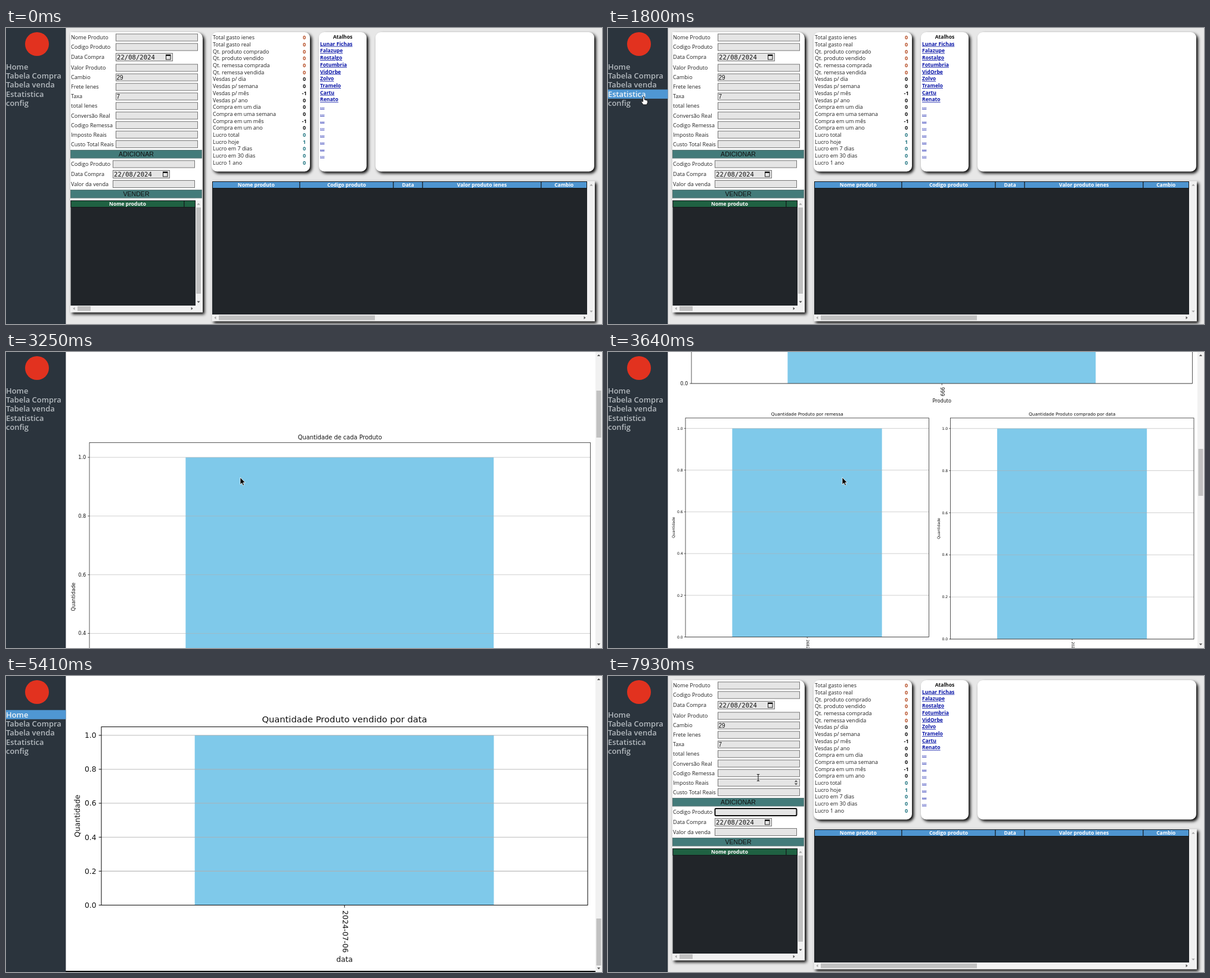
Recreate the animation shown at these times as an HTML page. Size 1000 by 498 pixels, loop 8 s.

```html
<!DOCTYPE html>
<html lang="pt">
<head>
<meta charset="utf-8">
<style>
  html, body { margin: 0; height: 100%; overflow: hidden; background: #e7e7e7; }
  svg { display: block; width: 100vw; height: 100vh; }
  text { white-space: pre; }
  .ui { font-family: "Open Sans", "Noto Sans", sans-serif; }
  .plot { font-family: "DejaVu Sans", sans-serif; }
  .form { font-family: "Liberation Sans", sans-serif; }
  .mono { font-family: "DejaVu Sans Mono", monospace; }
  .card { filter: drop-shadow(3.2px 3.2px 2.6px #000); }
</style>
</head>
<body>
<svg id="stage" viewBox="0 0 1000 498" preserveAspectRatio="none"></svg>
<script>
const rect = (x, y, w, h, fill, more = '') =>
  `<rect x="${x}" y="${y}" width="${w}" height="${h}" fill="${fill}" ${more}/>`;
const group = (body, more = '') => `<g ${more}>${body}</g>`;
const path = (d, fill, more = '') => `<path d="${d}" fill="${fill}" ${more}/>`;

// y is the middle of the capitals
function text(s, x, y, size, { cls = 'ui', fill = '#222', anchor = 'start', weight = 400, turn = 0, more = '' } = {}) {
  return `<text class="${cls}" font-size="${size}" font-weight="${weight}" fill="${fill}" text-anchor="${anchor}"
    transform="translate(${x} ${y}) rotate(${turn})" y="${size * 0.36}" ${more}>${s}</text>`;
}

const arrow = (x, y, turn, fill = '#505050') =>
  path('M-2.6 1.4L0 -1.6L2.6 1.4Z', fill, `transform="translate(${x} ${y}) rotate(${turn})"`);

// ---------- sidebar ----------
const ROW = 15.4, NAV_TOP = 57.3;
const nav = ['Home', 'Tabela Compra', 'Tabela venda', 'Estatistica', 'config'];
const sidebar = rect(0, 0, 100.4, 498, '#2b343d') +
  '<circle cx="52" cy="27" r="20" fill="#e2321f"/>' +
  rect(0, 0, 100.4, ROW, '#4f97d3', 'id="hover"') +
  nav.map((s, i) => text(s, 0, NAV_TOP + ROW * (i + 0.5), 12.9, { fill: '#b4babf', weight: 600 })).join('');

// ---------- home page ----------
const labels = ['Nome Produto', 'Codigo Produto', 'Data Compra', 'Valor Produto', 'Cambio', 'Frete Ienes',
  'Taxa', 'total Ienes', 'Conversão Real', 'Codigo Remessa', 'Imposto Reais', 'Custo Total Reais'];
const fieldY = i => i < 2 ? 16 + 16 * i : i === 2 ? 49 : 67 + 16.05 * (i - 3);
const label = (s, y) => text(s, 109, y, 9.1);
const box = (x, y, w, h) => rect(x + 0.5, y - h / 2 + 0.5, w - 1, h - 1, '#e5e5e5', 'stroke="#777" stroke-width="1"');
const field = (x, y, value = '') => box(x, y, 138, 13) + text(value, x + 1.5, y, 10, { cls: 'form', fill: '#111' });
const dateField = (x, y) => box(x, y, 96, 14) +
  text('22/08/2024', x + 2, y, 10.6, { cls: 'mono', fill: '#111' }) +
  rect(x + 84.5, y - 4, 7.5, 8, 'none', 'stroke="#111" stroke-width=".9"') + rect(x + 84.5, y - 4, 7.5, 2, '#111');
const button = (s, y) => rect(108.5, y - 6.5, 220, 13.5, '#437b7a', 'stroke="#5c7776"') +
  text(s, 218.5, y, 10.6, { cls: 'form', fill: '#111', anchor: 'middle' });

// header cells share their edges; edges = list of x positions
const tableHead = (y, h, edges, names, fill) => names.map((s, i) => {
  const [a, b] = [edges[i], edges[i + 1]];
  return rect(a, y, b - a, h, fill, 'stroke="#15191c" stroke-width="1"') +
    text(s, (a + b) / 2, y + h / 2, 8.5, { fill: '#fff', anchor: 'middle', weight: 700 });
}).join('');

const formCard = group(
  path('M108 7H320A10 10 0 0 1 330 17V478.5H108Z', '#fff'), 'class="card"') +
  labels.map((s, i) => label(s, fieldY(i)) +
    (i === 2 ? dateField(184, 49) : field(184, fieldY(i), { 4: '29', 6: '7' }[i]))).join('') +
  button('ADICIONAR', 212) +
  label('Codigo Produto', 229) + field(179, 229) +
  label('Data Compra', 246) + dateField(179, 246) +
  label('Valor da venda', 262.5) + field(179, 262.5) +
  button('VENDER', 279) +
  rect(108.5, 290, 209.5, 177, '#212529') +
  tableHead(290.5, 11, [109, 299, 317.5], ['Nome produto', ''], '#1f6142') +
  rect(318, 290, 11, 177, '#f1f1f1') + rect(319, 302, 8, 145, '#c1c1c1') +
  arrow(323, 296, 0, '#a3a3a3') + arrow(323, 461, 180) +
  rect(108.5, 467, 220.5, 11, '#f1f1f1') + rect(120, 468, 22, 8, '#c1c1c1') +
  arrow(114, 472, -90, '#a3a3a3') + arrow(312, 472, 90);

const card = (x, w) => rect(x, 7, w, 234.5, '#fff', 'rx="9" class="card"');
const totals = ['Total gasto ienes', 'Total gasto real', 'Qt. produto comprado', 'Qt. produto vendido',
  'Qt. remessa comprada', 'Qt. remessa vendida', 'Vesdas p/ dia', 'Vesdas p/ semana', 'Vesdas p/ mês',
  'Vesdas p/ ano', 'Compra em um dia', 'Compra em uma semana', 'Compra em um mês', 'Compra em um ano',
  'Lucro total', 'Lucro hoje', 'Lucro em 7 dias', 'Lucro em 30 dias', 'Lucro 1 ano'];
const values = { 8: '-1', 12: '-1', 15: '1' };
const totalsCard = card(345, 165) + totals.map((s, i) => {
  const y = 16 + 11.7 * i;
  const fill = i < 6 ? '#b4481f' : i < 14 ? '#111' : '#1f7480';
  return text(s, 347, y, 9) + text(values[i] || '0', 500.5, y, 9, { fill, anchor: 'middle', weight: 700 });
}).join('');

const links = ['Lunar Fichas', 'Falazupe', 'Rostalgo', 'Fotumbria', 'VidOrbe', 'Zolvo', 'Tramelo', 'Cartu', 'Renato',
  ...Array(8).fill('...')];
const linksCard = card(525, 80) + text('Atalhos', 565, 14.5, 8.6, { fill: '#111', anchor: 'middle', weight: 700 }) +
  links.map((s, i) => text(s, 527, 26.5 + 11.73 * i, 8.6,
    { fill: '#0a16a8', weight: 700, more: 'text-decoration="underline"' })).join('');

const tableCard = rect(345.5, 257.5, 642.5, 236, '#f1f1f1', 'class="card"') +
  rect(346, 258, 629, 224, '#212529') +
  tableHead(258.5, 11, [346.5, 493, 650, 699, 898, 974.5],
    ['Nome produto', 'Codigo produto', 'Data', 'Valor produto ienes', 'Cambio'], '#4e95d0') +
  rect(357, 483.5, 262, 8, '#c1c1c1') +
  arrow(982, 264, 0, '#a3a3a3') + arrow(982, 477, 180, '#a3a3a3') +
  arrow(351, 487.5, -90, '#a3a3a3') + arrow(971, 487.5, 90);

const home = rect(100, 0, 900, 498, '#e7e7e7') + formCard + totalsCard + linksCard + card(620, 367) + tableCard +
  rect(179.5, 223, 137, 12, 'none', 'id="focus" rx="2" stroke="#101010" stroke-width="2"') +
  group(arrow(0, -2.5, 0) + arrow(0, 2.5, 180), 'id="spinner"');

// ---------- statistics page ----------
const PAGE = 3000, MAX = PAGE - 498;
const plotText = (s, x, y, size, o = {}) => text(s, x, y, size, { cls: 'plot', fill: '#111', anchor: 'middle', ...o });

function barChart(x, y, w, h, title, size, tick, name, drop) {
  const s = size / 1.2, bottom = y + h, mid = x + w / 2, top = y + h / 21;
  const line = `stroke-width="${Math.max(0.7, s * 0.085)}"`;
  let out = rect(x + w * 0.192, top, w * 0.615, bottom - top, '#7fc9ea');
  for (let i = 0; i < 6; i++) {
    const ty = bottom - (bottom - top) * i / 5;
    out += path(`M${x} ${ty}h${w}`, 'none', `stroke="#b0b0b0" stroke-opacity=".85" ${line}`) +
      path(`M${x} ${ty}h${-s * 0.35}`, 'none', `stroke="#111" ${line}`) +
      plotText((i / 5).toFixed(1), x - s * 0.7, ty, s, { anchor: 'end' });
  }
  return out + rect(x, y, w, h, 'none', `stroke="#111" ${line}`) +
    path(`M${mid} ${bottom}v${s * 0.35}`, 'none', `stroke="#111" ${line}`) +
    plotText(title, mid, y - size * 0.88, size) +
    plotText('Quantidade', x - s * 3.3, y + h / 2, s, { turn: -90 }) +
    plotText(tick, mid + 1, bottom + s * 0.72, s, { turn: 90, anchor: 'start' }) +
    plotText(name, mid, bottom + drop, s);
}

function pieChart(cx, top, title, name, filled) {
  const cy = top + 224.5;
  return plotText(title, cx, top + 47, 7.35) + plotText(name, cx - 177, cy, 6.1, { turn: -90 }) +
    (filled ? `<circle cx="${cx}" cy="${cy}" r="136.8" fill="#1772b2"/>` +
      plotText('999', cx - 148, cy + 26, 6.1, { anchor: 'end' }) + plotText('100%', cx - 81, cy + 14, 6.1) : '');
}

const banner = (s, y) => rect(100, y, 889, 26, '#000') +
  text(s, 545, y + 14, 22.4, { fill: '#fff', anchor: 'middle', weight: 600 });
const costs = 'Distribuição de Custos total em ';
const stats = rect(100, 0, 900, PAGE, '#fff') +
  banner('Tabela compra estatistica', 0) +
  pieChart(328, 26, costs + 'reais por Tipo de Produto', 'custototalreais') +
  pieChart(772.5, 26, costs + 'ienes por Tipo de Produto', 'totalienes') +
  barChart(140, 492.5, 840.5, 518.5, 'Quantidade de cada Produto', 9.85, '999', 'Produto', 29) +
  barChart(130, 1069, 408.5, 368.5, 'Quantidade Produto por remessa', 7.3, '2682413570', 'remessa', 50) +
  barChart(574.5, 1069, 408.5, 372, 'Quantidade Produto comprado por data', 7.3, '2024-07-06', 'data', 46) +
  banner('Tabela venda estatistica', 1501) +
  barChart(140, 1544, 840.5, 519, 'Quantidade de cada Produto', 9.85, '999', 'Produto', 29) +
  rect(100, 2105, 889, 2, '#000') +
  pieChart(328, 2107, costs + 'ienes por Tipo de Produto vendido', 'totalienes', true) +
  pieChart(772.5, 2107, costs + 'reais por Tipo de Produto vendido', 'valorvenda', true) +
  barChart(160, 2587.5, 816, 300, 'Quantidade Produto vendido por data', 14.7, '2024-07-06', 'data', 91) +
  rect(100, 2998, 889, 2, '#000');
const scrollbar = rect(989, 0, 11, 498, '#f1f1f1') + rect(990.5, 11, 8, 79, '#c1c1c1', 'id="thumb"') +
  arrow(994.5, 5.5, 0) + arrow(994.5, 492, 180);

// ---------- pointers, tip at 0,0 ----------
const pointers = {
  arrow: path('M0 0V12L2.8 9.5L4.6 13.6L6.6 12.7L4.8 8.8H8.4Z', '#000', 'stroke="#fff" stroke-width=".8"'),
  hand: path('M-1.4 0Q0 -1.6 1.2 0V4.5L6.5 6V9.5L5 13H-1L-4 8.5Q-4 6.5 -1.4 8Z', '#fff',
    'stroke="#111" stroke-width=".9"'),
  beam: path('M-2.2 -5.5H2.2M0 -5.5V5.5M-2.2 5.5H2.2', 'none', 'stroke="#222" stroke-width="1.1"'),
};

stage.innerHTML = group(home, 'id="home"') +
  group(group(stats, 'id="page"') + scrollbar, 'id="stats"') + sidebar +
  group(Object.entries(pointers).map(([k, p]) => group(p, `id="p-${k}"`)).join(''), 'id="pointer"');

// ---------- motion ----------
const LOOP = 8000, OPEN = 2590, CLOSE = 5460, FOCUS = 7250;
const moves = [[0, -20, 300], [490, -20, 300], [630, 20, 250], [800, 20, 250], [1530, 58, 97], [1799, 58, 97],
  [1800, 60, 116], [2260, 60, 116], [2380, 230, 190], [2589, 230, 190], [2590, 349, 217], [2620, 349, 217],
  [2700, 375, 222], [2850, 375, 222], [2870, 393, 211], [4880, 393, 211], [5230, 40, 65], [5460, 40, 65],
  [6120, 300, 140], [6490, 300, 140], [7250, 255, 228], [7580, 255, 228], [7930, 252, 171], [8000, 252, 171]];
const wheel = [[0, 0], [3010, 100], [3100, 220], [3190, 340], [3280, 460], [3370, 580], [3460, 700], [3550, 830],
  [3640, 958], [3700, 1060], [3820, 1200], [3910, 1380], [4000, 1560], [4100, 1760], [4240, 1890], [4270, 2023],
  [4640, 2140], [4700, 2260], [4770, 2380], [4840, MAX]];

const $ = id => document.getElementById(id);
const show = (id, on) => $(id).setAttribute('visibility', on ? 'visible' : 'hidden');
const move = (id, x, y) => $(id).setAttribute('transform', `translate(${x} ${y})`);
const navTexts = document.querySelectorAll('#stage > text');

function pointerAt(t) {
  const i = moves.findIndex(m => m[0] > t);
  const [t0, x0, y0] = moves[i - 1], [t1, x1, y1] = moves[i];
  const k = (t - t0) / (t1 - t0), e = k * k * (3 - 2 * k);
  return [x0 + (x1 - x0) * e, y0 + (y1 - y0) * e];
}

function draw(now) {
  const t = now % LOOP;
  const onStats = t >= OPEN && t < CLOSE;
  $('home').style.display = onStats ? 'none' : '';
  $('stats').style.display = onStats ? '' : 'none';

  const scroll = wheel.findLast(w => w[0] <= t)[1];
  move('page', 0, -scroll);
  $('thumb').setAttribute('y', 11 + scroll / MAX * 397);

  const [x, y] = pointerAt(t);
  const row = x >= 0 && x < 100 ? Math.floor((y - NAV_TOP) / ROW) : -1;
  const hovered = row >= 0 && row < nav.length;
  show('hover', hovered);
  $('hover').setAttribute('y', NAV_TOP + ROW * row);
  navTexts.forEach((n, i) => n.setAttribute('fill', i === row ? '#eef3f7' : '#b4babf'));

  const inForm = !onStats && x > 108 && x < 322 && (y < 204 || Math.abs(y - 229) < 7);
  const kind = hovered ? 'hand' : inForm ? 'beam' : 'arrow';
  const visible = t < 5410 || t >= CLOSE;
  for (const k in pointers) show('p-' + k, visible && k === kind);
  move('pointer', x, y);

  const over = labels.findIndex((_, i) => i > 2 && i !== 9 && Math.abs(y + 4 - fieldY(i)) < 6.5);
  const spin = inForm && x > 184 && over >= 0;
  $('spinner').style.display = spin ? '' : 'none';
  if (spin) move('spinner', 315.5, fieldY(over));
  $('focus').style.display = t >= FOCUS ? '' : 'none';
}

const start = performance.now();
function tick() {
  draw(performance.now() - start);
  requestAnimationFrame(tick);
}
tick();
</script>
</body>
</html>
```
